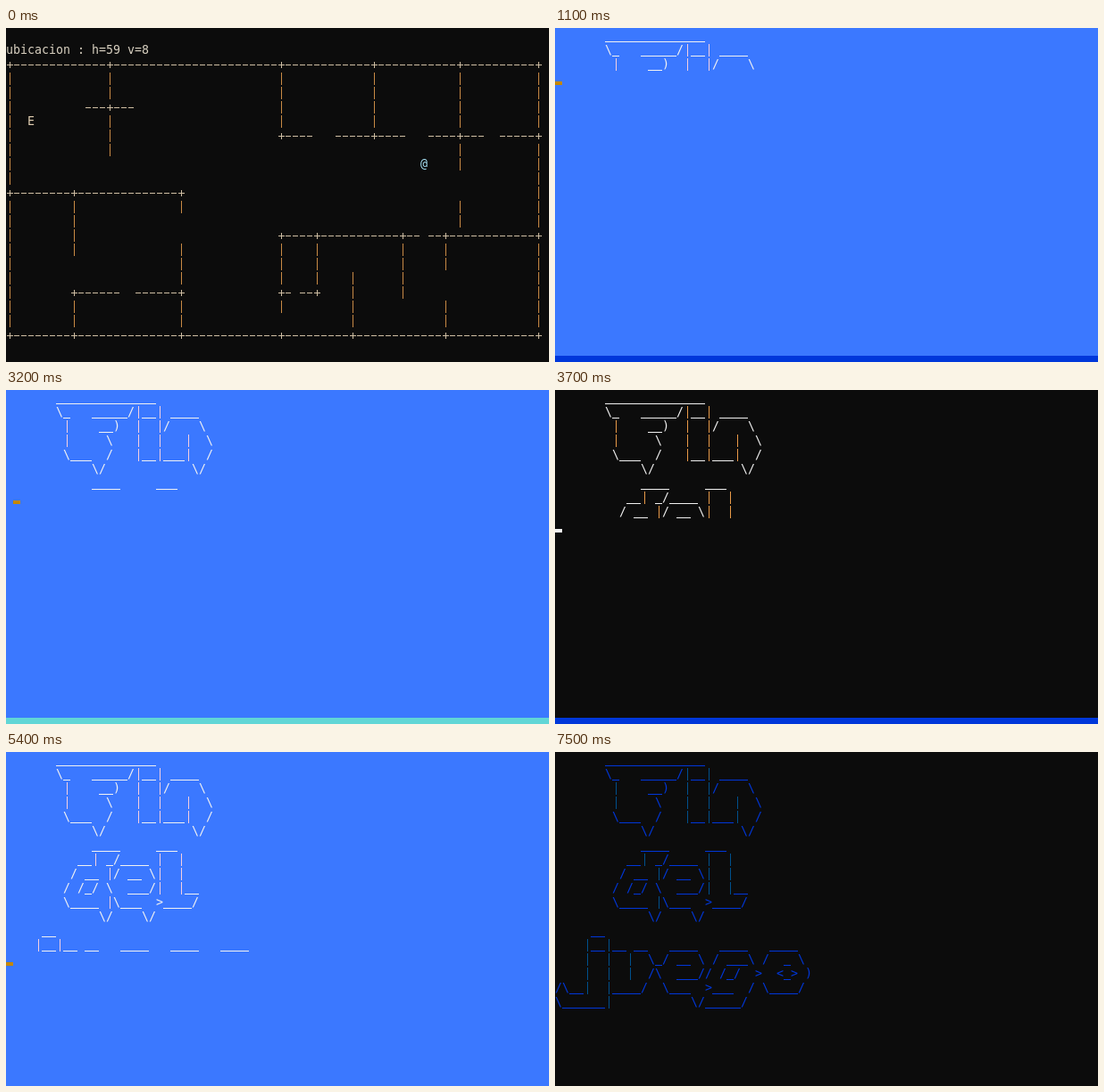
An HTML page with a canvas for the animation above (7.8 s loop, 608 px wide and 375 px high).

```html
<!DOCTYPE html>
<html lang="es">
<head>
<meta charset="utf-8">
<style>
html, body { margin: 0; height: 100%; overflow: hidden; background: #0c0c0c; }
canvas { display: block; }
</style>
</head>
<body>
<canvas id="stage" width="608" height="375"></canvas>
<script>
const ctx = document.getElementById('stage').getContext('2d');
const CELL = 8, LINE = 16, EDGE = 368, LOOP = 7800;

const BLACK = '#0c0c0c', BLUE = '#0037da', SKY = '#3b78ff', CYAN = '#61d6d6', WHITE = '#f2f2f2';
const CURSOR = { [BLACK]: '#f3f3f3', [BLUE]: '#ffc825', [SKY]: '#c48700', [CYAN]: '#9e2929' };
// Upright bars take a tint from subpixel rendering
const BAR = { [BLACK]: '#e89a48', [BLUE]: '#f0c090', [SKY]: '#f5cfe0', [CYAN]: '#f5e6dc' };
const DIM_BAR = { [CYAN]: '#4a9a96', [SKY]: '#2470b0', [BLUE]: '#00508c' };

const BANNER = String.raw`
       ______________
       \_   _____/|__| ____
        |    __)  |  |/    \
        |     \   |  |   |  \
        \___  /   |__|___|  /
            \/            \/
            ____     ___
          __| _/____ |  |
         / __ |/ __ \|  |
        / /_/ \  ___/|  |__
        \____ |\___  >____/
             \/    \/
     __
    |__|__ __   ____   ____   ____
    |  |  |  \_/ __ \ / ___\ /  _ \
    |  |  |  /\  ___// /_/  >  <_> )
/\__|  |____/  \___  >___  / \____/
\______|           \/_____/`.split('\n').slice(1);

// column: spans of rows
const WALLS = {
  0: '3-10 12-20', 9: '12-15 19-20', 14: '3-4 6-8', 24: '12-12 15-17 19-20',
  38: '3-6 15-17 19-19', 43: '15-17', 48: '17-20', 51: '3-6', 55: '15-18',
  61: '15-16 19-20', 63: '3-6 8-9 12-13', 74: '3-6 8-13 15-20'
};
const beam = (...gaps) => '+' + gaps.map(n => '-'.repeat(n) + '+').join('');

function put(col, row, text, color, bar = color) {
  [...text].forEach((ch, i) => {
    const x = (col + i) * CELL, y = row * LINE;
    ctx.fillStyle = ch === '|' ? bar : color;
    if (ch === '_') ctx.fillRect(x, y + 15, 8, 1);
    else if (ch === '|') ctx.fillRect(x + 4, y + 2, 1, 14);
    else if (ch === '-') ctx.fillRect(x + 1, y + 9, 6, 1);
    else if (ch === '+') {
      ctx.fillRect(x + 1, y + 9, 7, 1);
      ctx.fillRect(x + 4, y + 6, 1, 7);
    } else if (ch !== ' ') ctx.fillText(ch, x, y + 13);
  });
}

function fillStage(main, edge) {
  ctx.fillStyle = main;
  ctx.fillRect(0, 0, 608, EDGE);
  ctx.fillStyle = edge;
  ctx.fillRect(0, EDGE, 608, 7);
}

function drawMap() {
  const ink = '#d0bfa4', bar = '#c88a45';
  fillStage(BLACK, BLACK);
  put(0, 1, 'ubicacion : h=59 v=8', '#d8d0c0');
  put(0, 2, beam(13, 23, 12, 11, 10), ink);
  put(11, 5, '---+---', ink);
  put(3, 6, 'E', '#e0cdb0');
  put(38, 7, '+----   -----+----   ----+---  -----+', ink);
  put(58, 9, '@', '#a8e4f8');
  put(0, 11, beam(8, 14), ink);
  put(38, 14, beam(4, 11) + '-- --' + beam(12), ink);
  put(9, 18, '+------  ------+', ink);
  put(38, 18, '+- --+', ink);
  put(0, 21, beam(8, 14, 13, 9, 12, 12), ink);
  for (const col in WALLS)
    for (const span of WALLS[col].split(' ')) {
      const [from, to] = span.split('-').map(Number);
      for (let row = from; row <= to; row++) put(+col, row, '|', bar);
    }
}

function drawBanner(rows, main, edge, cursorCol = 0, ink = WHITE) {
  fillStage(main, edge);
  const bar = DIM_BAR[ink] || BAR[main];
  for (let r = 0; r < rows; r++) put(0, r, BANNER[r], ink, bar);
  if (ink === WHITE) {
    ctx.fillStyle = CURSOR[main];
    ctx.fillRect(cursorCol * CELL, rows * LINE + 12, 8, 4);
  }
}

// start time, lines shown, background, bottom edge, cursor column, ink
const STEPS = [
  [150, 0, BLACK, BLACK],
  [200, 0, BLACK, BLACK, 1],
  [250, 1, BLUE, BLACK],
  [650, 2, BLUE, BLUE],
  [1050, 2, BLUE, BLUE, 1],
  [1100, 3, SKY, BLUE],
  [1500, 4, CYAN, SKY],
  [1900, 4, CYAN, SKY, 1],
  [1950, 5, CYAN, CYAN],
  [2300, 5, CYAN, CYAN, 1],
  [2350, 6, CYAN, CYAN],
  [2750, 6, CYAN, CYAN, 1],
  [2800, 7, SKY, CYAN],
  [3200, 7, SKY, CYAN, 1],
  [3250, 8, BLUE, SKY],
  [3650, 8, BLUE, SKY, 1],
  [3700, 9, BLACK, BLUE],
  [4100, 10, BLACK, BLACK],
  [4500, 10, BLACK, BLACK, 1],
  [4550, 11, BLUE, BLACK],
  [4950, 12, SKY, BLUE],
  [5400, 14, SKY, SKY],
  [6150, 15, CYAN, SKY],
  [6350, 17, BLUE, SKY],
  [6400, 18, BLACK, BLUE],
  [7250, 18, BLACK, BLACK],
  [7350, 18, BLACK, BLACK, 0, CYAN],
  [7400, 18, BLACK, BLACK, 0, SKY],
  [7500, 18, BLACK, BLACK, 0, BLUE]
];

ctx.font = '13.29px "DejaVu Sans Mono", monospace';
let shown;
function tick() {
  const t = performance.now() % LOOP;
  const n = STEPS.filter(s => s[0] <= t).length;
  if (n !== shown) {
    shown = n;
    if (n) drawBanner(...STEPS[n - 1].slice(1));
    else drawMap();
  }
  requestAnimationFrame(tick);
}
tick();
</script>
</body>
</html>
```
